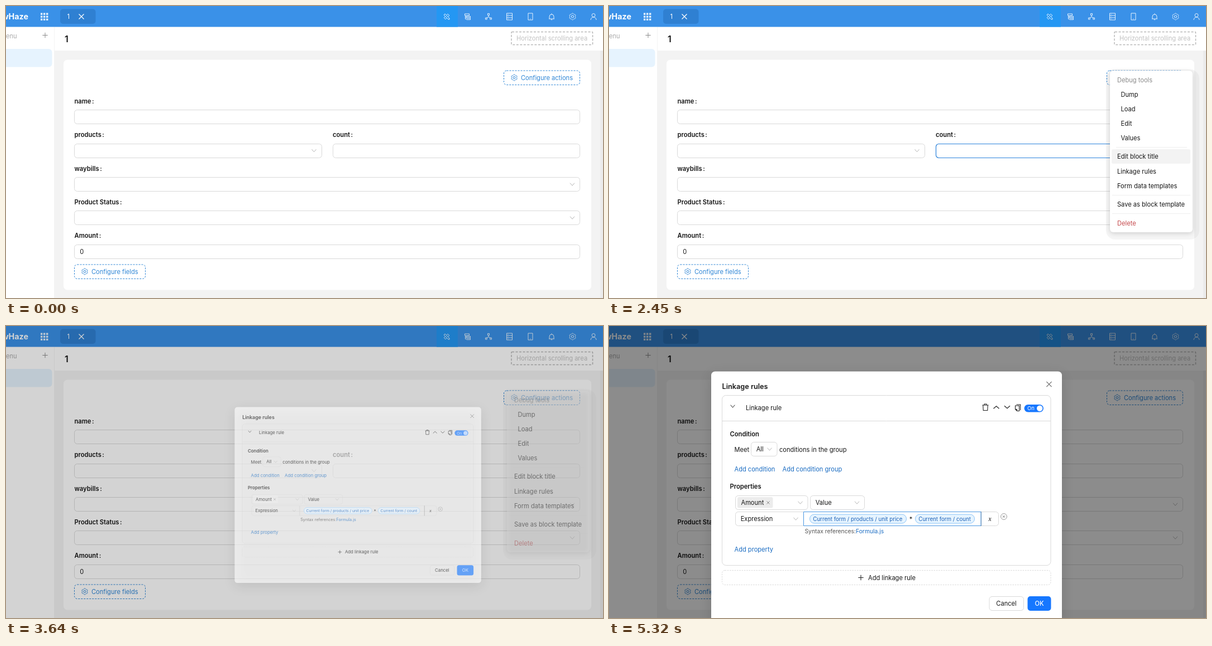
Animation, 1069 px wide and 524 px high, one loop 8000 ms. Source, as an HTML page with a canvas:

```html
<!DOCTYPE html>
<html lang="en">
<head>
<meta charset="utf-8">
<title>Linkage rules</title>
<style>
html, body { margin: 0; width: 100%; height: 100%; overflow: hidden; background: #fff; }
canvas { display: block; width: 1069px; height: 524px; }
</style>
</head>
<body>
<canvas id="stage"></canvas>
<script>
const W = 1069, H = 524, LOOP = 8000, STEP = 70;
const BLUE = '#3a91e8', LINK = '#2f86d6', ANCHOR = '#1a6cc2', PRIMARY = '#1677ff';
const INK = '#161616', LINE = '#d9d9d9', SOFT = '#b5b5b5';

const canvas = document.getElementById('stage');
const dpr = window.devicePixelRatio || 1;
canvas.width = W * dpr;
canvas.height = H * dpr;
const c = canvas.getContext('2d');

const ramp = (t, a, b) => Math.min(1, Math.max(0, (t - a) / (b - a)));
const within = (t, a, b) => t >= a && t < b;

// y is the middle of the capital letters
function text(str, x, y, color = INK, size = 11.1, weight = 400, align = 'left') {
  c.font = `${weight} ${size}px Inter, "Liberation Sans", sans-serif`;
  c.textAlign = align;
  c.fillStyle = color;
  c.fillText(str, x, y + size * 0.364);
}
const bold = (str, x, y, size = 11.2) => text(str, x, y, INK, size, 600);

function fillBox(x, y, w, h, r, color) {
  c.beginPath();
  c.roundRect(x, y, w, h, r);
  c.fillStyle = color;
  c.fill();
}

function frame(x, y, w, h, r, color = LINE, dash = [], width = 1) {
  c.beginPath();
  c.roundRect(x + 0.5, y + 0.5, w - 1, h - 1, r);
  c.setLineDash(dash);
  c.lineWidth = width;
  c.strokeStyle = color;
  c.stroke();
  c.setLineDash([]);
}

function line(x1, y1, x2, y2, color, width = 1) {
  c.beginPath();
  c.moveTo(x1, y1);
  c.lineTo(x2, y2);
  c.lineWidth = width;
  c.strokeStyle = color;
  c.stroke();
}

// strokes a path drawn around its own centre
function icon(d, x, y, color, width = 1) {
  c.save();
  c.translate(x, y);
  c.lineWidth = width;
  c.strokeStyle = color;
  c.stroke(new Path2D(d));
  c.restore();
}

const chevron = (x, y, color = SOFT, w = 4, dir = 1, width = 1) =>
  icon(`M${-w} ${-2.3 * dir}L0 ${2.3 * dir}L${w} ${-2.3 * dir}`, x, y, color, width);
const cross = (x, y, s, color, width = 1) =>
  icon(`M${-s} ${-s}L${s} ${s}M${s} ${-s}L${-s} ${s}`, x, y, color, width);
const plus = (x, y, s, color, width = 1) =>
  icon(`M${-s} 0H${s}M0 ${-s}V${s}`, x, y, color, width);

function gear(x, y, color, r = 5) {
  c.beginPath();
  for (let i = 0; i <= 60; i++) {
    const a = i / 60 * Math.PI * 2;
    const d = r + 0.55 * Math.cos(6 * a + Math.PI);
    c.lineTo(x + d * Math.cos(a), y + d * Math.sin(a));
  }
  c.moveTo(x + r * 0.4, y);
  c.arc(x, y, r * 0.4, 0, Math.PI * 2);
  c.lineWidth = 1;
  c.strokeStyle = color;
  c.stroke();
}

const TOOLS = [
  [789, 'M-5 -3L-3 -5L5 3L5 5L3 5ZM2 -4.8L4.8 -2L2 .8M-.8 -2L2 -4.8M-2 -.8L-4.8 2L-2 4.8L.8 2'],
  [826.5, 'M-5 -5H3V-2H-5ZM-2 -.5H5V2H-2ZM-2 3H5V5.5H-2M-4 -2V4.3H-2M-4 .8H-2'],
  [864, 'M-1.5 -5.5H1.5V-2.5H-1.5ZM0 -2.5V.5L-3.5 2.5M0 .5L3.5 2.5M-5.5 2.2H-2.8V5H-5.5ZM2.8 2.2H5.5V5H2.8Z'],
  [901.5, 'M-5 -6H5V6H-5ZM-5 -2H5M-5 2H5M-3 -4H-2M-3 0H-2M-3 4H-2'],
  [939, 'M-4 -6H4V6H-4ZM-.6 4H.6'],
  [977, 'M-5 4H5M-4 4V0A4 4 0 0 1 4 0V4M0 -5.7V-4M-1.3 5.6H1.3'],
  [1052, 'M-3 -2.4A3 3 0 1 1 3 -2.4A3 3 0 1 1 -3 -2.4M-5 6A5 5 0 0 1 5 6']
];

function header() {
  c.fillStyle = BLUE;
  c.fillRect(0, 0, W, 37.5);
  c.fillStyle = '#2497f3';
  c.fillRect(771, 0, 38, 37.5);
  text('wHaze', 40, 19, '#fff', 14.3, 700, 'right');
  c.fillStyle = '#e4f1fd';
  for (let i = 0; i < 9; i++) c.fillRect(62 + i % 3 * 5, 12.5 + Math.floor(i / 3) * 5, 3.4, 3.4);
  fillBox(97, 5.5, 63.5, 26.5, 5, '#2f80d2');
  text('1', 109.5, 19, '#fff');
  cross(135, 19, 4.5, '#fff', 1.3);
  for (const [x, d] of TOOLS) icon(d, x, 19, '#e4f1fd');
  gear(1014.5, 19, '#e4f1fd', 5.4);
}

function sidebar(t) {
  c.fillStyle = '#fff';
  c.fillRect(0, 37.5, 86, H);
  if (within(t, 3570, 3640)) fillBox(-6, 41, 64, 26, 4, '#f1f1f1');
  text('enu', 0, 54, '#aaa');
  plus(70, 52.5, 4.7, '#8c8c8c');
  fillBox(-6, 77, 88.5, 32.5, 6, '#e6f3fe');
}

function configure(label, x, y, w) {
  frame(x, y, w, 26.5, 5, LINK, [3, 2]);
  gear(x + 19, y + 13, LINK);
  text(label, x + 31, y + 13, LINK);
}

function page() {
  c.fillStyle = '#f3f3f3';
  c.fillRect(86, 37.5, W, H);
  c.fillStyle = '#fff';
  c.fillRect(87, 37.5, W, 42.5);
  c.fillStyle = '#ebebeb';
  c.fillRect(1064, 80, 5, H);
  bold('1', 105, 59.5, 16);
  frame(904.5, 46, 146.5, 24, 1, '#b9b9b9', [4, 2.5], 1.5);
  text('Horizontal scrolling area', 914, 58, '#c2c2c2');
  fillBox(103, 96.5, 945, 413, 7, '#fff');
}

const rowY = i => Math.round(186.2 + 60.35 * i);

function label(str, x, row) {
  bold(str, x, 171 + 60.3 * row);
  bold(':', x + c.measureText(str).width + 1.5, 171 + 60.3 * row);
}

function form(t) {
  configure('Configure actions', 891, 115.5, 137);
  ['name', 'products', 'waybills', 'Product Status', 'Amount'].forEach((name, i) => {
    label(name, 122.5, i);
    frame(122, rowY(i), i === 1 ? 444 : 906, 26, 5);
  });
  label('count', 585, 1);
  frame(585, rowY(1), 443, 26, 5);
  chevron(551.5, 259.5);
  chevron(1014, 320);
  chevron(1014, 380);
  text('0', 132.3, 441);
  configure('Configure fields', 122, 463.5, 128);

  if (within(t, 840, 3360)) {
    c.globalAlpha = 1 - ramp(t, 3220, 3360);
    frame(585, rowY(1), 443, 26, 5, '#2b83dc', [], 1.2);
    c.globalAlpha = 1;
  }
  const blink = [[840, 1260], [1820, 2310], [2870, 3290]];
  if (blink.some(([a, b]) => within(t, a, b))) {
    c.fillStyle = '#111';
    c.fillRect(595, 253, 1, 14);
  }
}

function badge(x, y, d) {
  fillBox(x, y, 13, 13, 0, '#2f90e8');
  icon(d, x + 6.5, y + 6.5, '#fff');
}

function designer() {
  const bars = 'M-4 -3.5H4M-4 0H4M-4 3.5H4';
  frame(103, 96.5, 945, 413, 0, '#83bff2');
  fillBox(106, 99.5, 30, 13.5, 1, '#2f90e8');
  text('order', 108.3, 106.3, '#fff', 9.8);
  badge(1000.5, 99.5, 'M-5 0H5M0 -5V5M-3.5 -1.5L-5 0L-3.5 1.5M3.5 -1.5L5 0L3.5 1.5M-1.5 -3.5L0 -5L1.5 -3.5M-1.5 3.5L0 5L1.5 3.5');
  badge(1016, 99.5, 'M-4 0H4M0 -4V4');
  badge(1031, 99.5, bars);
  badge(1056, 39, bars);
}

const MENU = [
  ['Debug tools', 910, 132.5, '#8a8a8a'],
  ['Dump', 916.5, 158.5], ['Load', 916.5, 184.7], ['Edit', 916.5, 210.8], ['Values', 916.5, 237],
  ['Edit block title', 910, 270.3], ['Linkage rules', 910, 296.5], ['Form data templates', 910, 322.7],
  ['Save as block template', 910, 356], ['Delete', 910, 389.5, '#c5484b']
];

// menu row under the pointer
function hovered(t) {
  if (t < 2170) return -1;
  if (t < 2310) return 2;
  if (t < 2450) return 4;
  if (t < 2520) return 5;
  return t < 3080 ? 7 : t < 3570 ? 6 : -1;
}

function menu(t) {
  if (!within(t, 1750, 3710)) return;
  c.save();
  c.globalAlpha = 1 - ramp(t, 3570, 3710);
  c.translate(0, 116);
  c.scale(1, t < 1820 ? 0.993 : 1);
  c.translate(0, -116);
  fillBox(890, 114, 167, 305, 16, 'rgba(0,0,0,.04)');
  c.save();
  c.shadowColor = 'rgba(0,0,0,.16)';
  c.shadowBlur = 8 * dpr;
  c.shadowOffsetY = 2 * dpr;
  fillBox(897, 116, 148, 290, 6, '#fff');
  c.restore();
  const on = hovered(t);
  MENU.forEach(([str, x, y, color], i) => {
    if (i === on) fillBox(900, y - 13.2, 141, 26, 3, '#f3f3f3');
    text(str, x, y, color);
  });
  line(908, 253.5, 1035, 253.5, '#eee');
  line(901, 339.5, 1041, 339.5, '#eee');
  line(901, 372.5, 1041, 372.5, '#eee');
  c.restore();
}

function select(str, x, y, w) {
  frame(x, y, w, 26, 5);
  text(str, x + 9.7, y + 13);
  chevron(x + w - 14, y + 13);
}

function tag(str, x, w) {
  fillBox(x, 337.5, w, 17, 8.5, '#e6f4ff');
  frame(x, 337.5, w, 17, 8, '#8fc6f8');
  text(str, x + 6.3, 346, '#1d62b8', 9.7);
}

function ruleHead() {
  chevron(221.5, 144, '#222', 3.8);
  text('Linkage rule', 245, 147);
  icon('M-5.5 -4H5.5M-2 -4V-6H2V-4M-4.3 -4L-3.8 5.5H3.8L4.3 -4', 674, 146, '#222', 1.1);
  chevron(693.5, 146, '#222', 5, -1, 1.2);
  chevron(713, 145.5, '#222', 5, 1, 1.2);
  icon('M-4.5 -4H2.5V5.5H-1.5L-4.5 2.5ZM-4.5 2.5H-1.5V5.5M-2.5 -6H4.7V4', 732, 147, '#222', 1.1);
  fillBox(743.5, 141, 34.5, 13.5, 6.75, PRIMARY);
  text('On', 749, 148, '#fff', 9.5);
  fillBox(766, 142.6, 10.4, 10.4, 5.2, '#fff');
}

function expression(t) {
  frame(226, 333, 123, 26, [5, 0, 0, 5]);
  text('Expression', 235.7, 346.3);
  chevron(334.5, 346);
  frame(348, 333, 350, 26, [0, 5, 5, 0]);
  line(666.5, 333, 666.5, 359, '#8f8f8f');
  c.save();
  c.globalAlpha *= ramp(t, 5040, 5320);
  frame(348, 333, 318.5, 26, 0, '#4a97e2');
  c.restore();
  tag('Current form / products / unit price', 359, 174);
  text('*', 537.7, 347);
  tag('Current form / count', 548, 107);
  c.font = 'italic 11.5px "Liberation Serif", serif';
  c.textAlign = 'center';
  c.fillStyle = INK;
  c.fillText('x', 682, 350);
  c.beginPath();
  c.arc(707, 342, 5.4, 0, Math.PI * 2);
  c.lineWidth = 0.9;
  c.strokeStyle = '#8f8f8f';
  c.stroke();
  cross(707, 342, 2, '#8f8f8f');
}

function modal(t) {
  const p = ramp(t, 3580, 3850);
  if (!p) return;
  const ease = Math.sqrt(1 - (1 - p) ** 2), k = 0.2 + 0.8 * ease;
  c.save();
  c.globalAlpha = ease;
  c.translate(945, 297);
  c.scale(k, k);
  c.translate(-945, -297);

  c.save();
  c.shadowColor = 'rgba(0,0,0,.14)';
  c.shadowBlur = 22 * dpr;
  c.shadowOffsetY = 6 * dpr;
  fillBox(183, 81.5, 628, 449, 7, '#fff');
  c.restore();
  bold('Linkage rules', 202.5, 108, 12.7);
  cross(788, 104.5, 4.6, '#6c6c6c', 1.2);
  frame(202, 124, 589.5, 306, 7);
  line(202.5, 170.5, 791, 170.5, LINE);
  ruleHead();

  bold('Condition', 216.5, 194);
  text('Meet', 224.5, 221.5);
  select('All', 254, 208, 47.5);
  text('conditions in the group', 305, 221.5);
  text('Add condition', 224.5, 256.5, ANCHOR);
  text('Add condition group', 310.5, 256.5, ANCHOR);

  bold('Properties', 216.5, 287.5);
  frame(226, 304, 130.5, 26, 5);
  fillBox(230, 307, 63.5, 19.5, 3, '#ececec');
  text('Amount', 236.5, 317);
  cross(285, 317, 2.6, '#8c8c8c');
  chevron(342.5, 317);
  select('Value', 360, 304, 98);
  expression(t);
  text('Syntax references:', 350.5, 368.5, '#555', 10.3);
  text('Formula.js', 350.5 + c.measureText('Syntax references:').width, 368.5, ANCHOR, 10.3);
  text('Add property', 224.5, 401, ANCHOR);

  frame(202, 438, 589.5, 27, 5, LINE, [2.5, 1.8]);
  plus(451, 451.5, 4.7, '#222', 1.1);
  text('Add linkage rule', 464, 451.5);
  frame(680.5, 485, 62.5, 26, 5);
  text('Cancel', 711.5, 498, INK, 11.1, 400, 'center');
  fillBox(749.5, 485, 42, 26, 5, PRIMARY);
  text('OK', 770.5, 498, '#fff', 11.1, 500, 'center');
  c.restore();
}

function draw(t) {
  c.setTransform(dpr, 0, 0, dpr, 0, 0);
  c.clearRect(0, 0, W, H);
  page();
  sidebar(t);
  header();
  form(t);
  if (within(t, 910, 2170)) designer();
  menu(t);
  c.fillStyle = `rgba(0,0,0,${0.45 * ramp(t, 3520, 3830)})`;
  c.fillRect(0, 0, W, H);
  modal(t);
}

const start = performance.now();
function tick() {
  const t = (performance.now() - start) % LOOP;
  draw(Math.floor(t / STEP) * STEP);
  requestAnimationFrame(tick);
}
tick();
</script>
</body>
</html>
```
